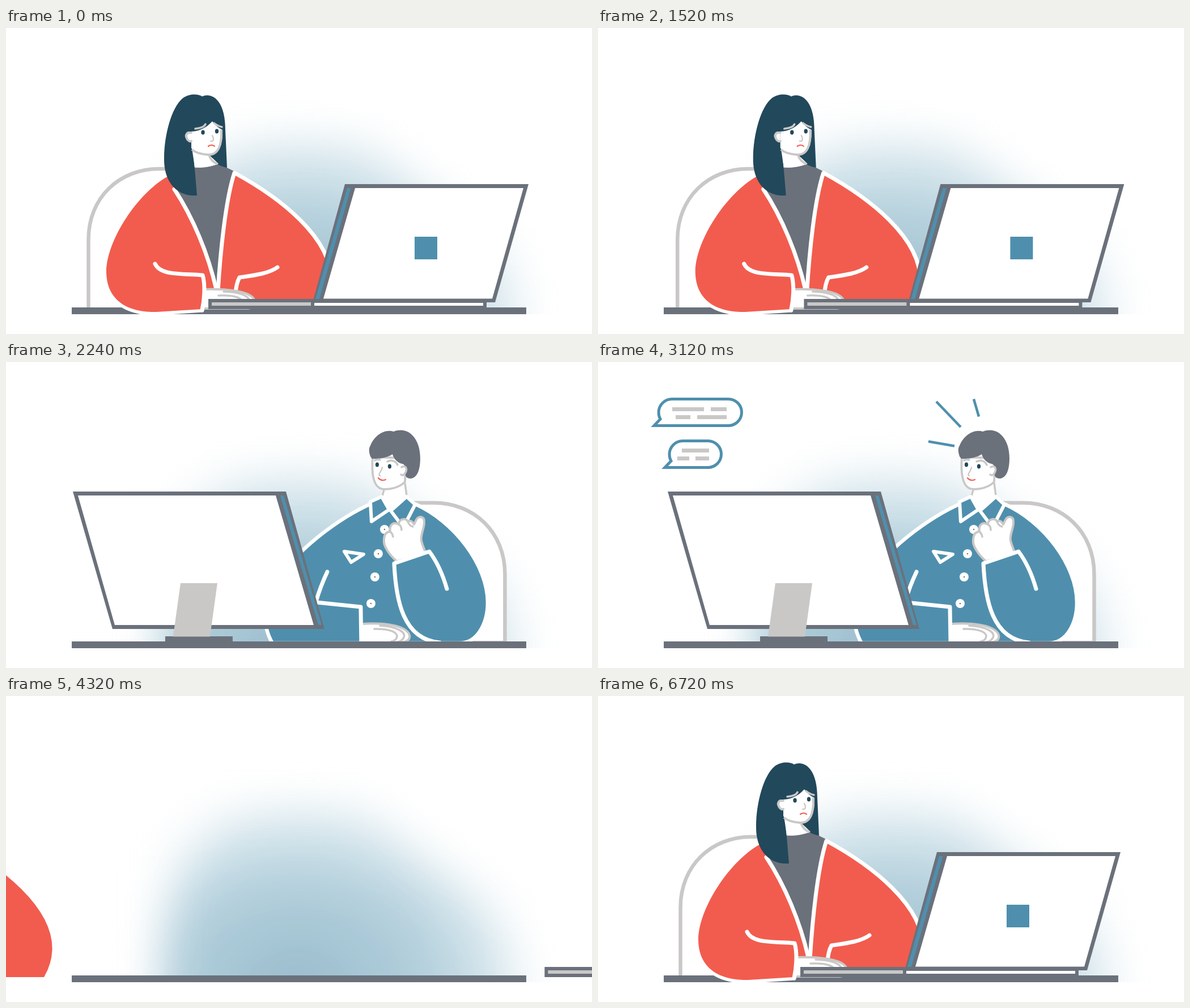
Write an HTML page with a canvas that moves like this. It is 1034 px wide and 541 px high and loops after 6.88 s.

```html
<!DOCTYPE html>
<html lang="en">
<head>
<meta charset="utf-8">
<title>Desk chat</title>
<style>
html, body { margin: 0; width: 100%; height: 100%; overflow: hidden; background: #fff; }
canvas { display: block; }
</style>
</head>
<body>
<canvas id="stage" width="1034" height="541"></canvas>
<script>
const W = 1034, H = 541, LOOP = 6880;
const SLATE = '#6b717b', BLUE = '#4f8fad', RED = '#f25c4e', NAVY = '#22485b', GREY = '#c9c8c7', WHITE = '#fff';
const c = document.getElementById('stage').getContext('2d');

const clamp = v => Math.max(0, Math.min(1, v));
const span = (t, start, dur) => clamp((t - start) / dur);
const inOut = u => u < .5 ? 4 * u ** 3 : 1 - 4 * (1 - u) ** 3;
const mix = (a, b, u) => a + (b - a) * u;

function fill(d, color) {
  c.fillStyle = color;
  c.fill(new Path2D(d));
}
function line(d, color, width, cap = 'round') {
  c.strokeStyle = color;
  c.lineWidth = width;
  c.lineCap = cap;
  c.lineJoin = cap === 'round' ? 'round' : 'miter';
  c.stroke(new Path2D(d));
}
function shape(d, color, edge, width) {
  fill(d, color);
  line(d, edge, width);
}
function rect(x, y, w, h, color) {
  c.fillStyle = color;
  c.fillRect(x, y, w, h);
}
function dot(x, y, rx, ry, color) {
  c.fillStyle = color;
  c.beginPath();
  c.ellipse(x, y, rx, ry, 0, 0, Math.PI * 2);
  c.fill();
}
function at(x, y, draw) {
  c.save();
  c.translate(x, y);
  draw();
  c.restore();
}
function faded(alpha, draw) {
  if (alpha <= 0) return;
  c.save();
  c.globalAlpha *= alpha;
  draw();
  c.restore();
}

// Soft blue glow, rendered once; stretched sideways about x = 515
const glow = document.createElement('canvas');
glow.width = W;
glow.height = H;
{
  const g = glow.getContext('2d');
  g.beginPath();
  g.rect(0, 0, W, 506);
  g.clip();
  g.translate(515, 0);
  g.scale(1.25, 1);
  g.translate(-515, 0);
  const tone = g.createRadialGradient(515, 515, 20, 515, 515, 380);
  tone.addColorStop(0, '#9abbce');
  tone.addColorStop(.2, '#a7c7d5');
  tone.addColorStop(.42, '#b0cdda');
  tone.addColorStop(.57, '#c3dae4');
  tone.addColorStop(.75, '#dae8ee');
  tone.addColorStop(.95, '#f0f6f9');
  g.fillStyle = tone;
  g.filter = 'blur(38px)';
  g.fill(new Path2D('M325 600V500C325 385 345 270 423 217C471 195 567 195 615 217C655 255 687 295 735 330C791 375 819 445 822 520V600Z'));
  g.globalAlpha = .13;
  g.fill(new Path2D('M319 600V240C343 180 423 190 479 195C551 190 615 165 663 220C687 290 807 310 839 400V600Z'));
}

// ---- woman ----
function womanBack() {
  shape('M145.5 496V374C145.5 300 200 249 270 249H350V496', WHITE, GREY, 6.5);
  fill('M300 280L332 247Q352 248 376 240L404 254L385 340L375 465H366Z', SLATE);
  fill('M402 258C480 298 577 370 574 450C573 470 567 485 560 497H340L372 462C375 400 385 310 402 258Z', RED);
  line('M374 465C378 400 387 305 403 256C480 298 577 370 574 450C573 470 567 485 560 497', WHITE, 7);
  line('M405 470Q406 452 412 441C440 437 464 434 479 423', WHITE, 7);
}

function womanFront(happy) {
  const coat = 'M286 262C232 292 178 375 177 430C177 482 215 503 265 502L346 497L350 462H371C357 400 328 335 297 283Z';
  line('M286 262C232 292 174 375 174 430C174 482 212 505 265 504.500L346 499', WHITE, 7);
  fill(coat, RED);
  line('M297 285C330 335 357 400 371 462', WHITE, 7);
  shape('M350 462C385 461 424 464 436 477C444 487 438 496 425 496H348', WHITE, GREY, 4);
  line('M375 473C395 472 416 475 417 484Q416 494 404 495', GREY, 3.5);
  line('M384 466C420 467 432 477 429 486Q426 494 414 496', GREY, 3.5);
  line('M263 417C272 436 300 434 347 437C352 455 350 480 346 499', WHITE, 7);

  // head
  fill('M346 121C361 114 387 124 387 180L390 247C380 245 366 240 360 226L328 190L337 296C300 299 278 270 279 230C279 190 292 140 312 124C325 115 340 117 346 121Z', NAVY);
  fill('M327 205L333 246Q352 249 375 240L358 224Z', WHITE);
  line('M359 227Q363 236 372 240', GREY, 4);
  fill('M327 178L364 162L382 178C383 208 375 226 355 225C340 224 330 218 327 212Z', WHITE);
  line('M380 180C381 207 375 225 356 224C342 223 333 219 328 215', GREY, 4, 'butt');
  shape('M327 185C319 183 316 190 319 195C321 200 325 201 327 200', WHITE, GREY, 4);
  fill('M322 183C338 184 352 178 364 165Q372 176 384 181L380 150L346 122L318 140Z', NAVY);
  const y = (a, b) => mix(a, b, happy).toFixed(2);
  line(`M334 ${y(178, 177)}C${y(343, 338)} ${y(177, 170)} ${y(350, 345)} ${y(175, 168)} 352 170`, GREY, 3.5);
  line(`M367 168C372 ${y(172, 168)} ${y(376, 378)} ${y(174, 171)} 381 175`, GREY, 3.5);
  dot(347.5, 184.500, 3.2, 4, NAVY);
  dot(372, 182.5, 3.2, 4, NAVY);
  line('M364 190C367 196 367 201 361 200', GREY, 2.2);
  line(`M357 209Q363 ${y(205, 214)} 368 ${y(209, 208.5)}`, RED, 2.2);
}

function laptop() {
  rect(357, 479, 491, 18, SLATE);
  rect(363, 485, 175, 6, GREY);
  rect(544, 486, 298, 5, WHITE);
  fill('M598 276H922L863 485H541Z', SLATE);
  fill('M616 283H913L858 478.500H560Z', WHITE);
  fill('M602 283H608.5L553 479H546Z', BLUE);
  rect(721, 369, 40, 40, BLUE);
}

// ---- man ----
function man() {
  shape('M700 249H755C825 249 880.500 300 880.500 375V496H700', WHITE, GREY, 6.5);
  shape('M660 244C600 267 522 322 477 387C452 427 452 465 470 497H800C832 497 850 462 850 425C850 360 792 282 722 251Z', BLUE, WHITE, 6.5);
  fill('M664 225L662 238L677 263L707 238L705 212Z', WHITE);
  line('M667 226L664 237M704 214L707 236', GREY, 3.5, 'butt');
  shape('M643 247L663 238L676 261L645 282Z', BLUE, WHITE, 6);
  shape('M679 263L707 238L722 252L706 283L694 283Z', BLUE, WHITE, 6);
  for (const [x, y] of [[668, 296], [657, 339], [651, 380], [644, 427]]) {
    dot(x, y, 8, 8, WHITE);
    dot(x, y, 1.2, 1.2, SLATE);
  }
  line('M597 335L631 340L609 354Z', WHITE, 6);

  // resting arm
  shape('M628 463C660 461 700 463 711 480C716 491 707 495 695 496H628', WHITE, GREY, 4);
  line('M650 472C675 471 690 477 690 485Q689 493 680 494', GREY, 3.5);
  line('M660 466C692 468 706 478 702 487Q699 494 690 495', GREY, 3.5);
  line('M567 371C558 390 551 410 547 424M539 424L626 433L627 496', WHITE, 7);

  // raised arm
  fill('M685 356L747 335C762 355 780 400 790 440L765 495C700 490 688 420 685 356Z', BLUE);
  shape('M688 351C676 340 666 325 667 316C667 306 670 300 678 300C676 287 684 282 693 287C693 277 706 275 709 282Q715 278 720 287L724 279C727 272 739 271 738 284C738 295 731 305 733 316C735 325 738 330 740 336', WHITE, GREY, 4);
  line('M678 300Q682 303 683 309M693 287Q698 290 698 297M709 282Q712 290 718 291', GREY, 3.5);
  line('M778 401C772 380 762 355 747 335L685 356C688 420 700 490 765 496', WHITE, 7);

  // head
  shape('M647 168C645 195 648 215 658 222C665 227 690 226 704 212L706 170Z', WHITE, GREY, 3.8);
  fill('M643 167C640 158 640 152 643 148C650 130 668 118 684 123C710 113 731 135 731 170C731 190 726 205 714 206C708 206 705 203 705 199C708 190 704 180 699 180C690 178 684 170 682 163C675 168 660 172 646 171Z', SLATE);
  shape('M698 186C706 181 709 190 704 197Q701 202 697 199', WHITE, GREY, 3.5);
  line('M651 174Q655 171 660 173M673 176C680 172 688 175 691 182', GREY, 3.5);
  dot(655, 181.5, 3.1, 4, NAVY);
  dot(677, 184.500, 3.1, 4, NAVY);
  line('M664 186C664 192 655 199 660 201', GREY, 2.2);
  line('M657 205Q662 211 670 208', RED, 2.2);
}

function monitor() {
  rect(281, 485, 119, 10, SLATE);
  fill('M118 229H494L562 472H188Z', SLATE);
  fill('M127 236H476L543 465H192Z', WHITE);
  fill('M484 236H490L557 465H551Z', BLUE);
  fill('M308 391H373L360 485.500H295Z', GREY);
}

// ---- signs ----
// x, y: top left; w: width up to the tail tip
function bubble(x, y, w, h) {
  const l = x + 2.5, t = y + 2.5, b = y + h - 2.5, r = (b - t) / 2, e = x + w - 13;
  c.beginPath();
  c.moveTo(l + r, t);
  c.lineTo(e - r, t);
  c.bezierCurveTo(e - r * .45, t, e, t + r * .45, e, t + r);
  c.quadraticCurveTo(e, t + r * 1.3, e - 3, b - 11.5);
  c.lineTo(x + w - 5, b);
  c.lineTo(l + r, b);
  c.arc(l + r, t + r, r, Math.PI / 2, Math.PI * 1.5);
  c.closePath();
  c.fillStyle = WHITE;
  c.fill();
  c.strokeStyle = BLUE;
  c.lineWidth = 5;
  c.lineJoin = 'miter';
  c.stroke();
}
function bars(x, y, rows) {
  rows.forEach((row, i) => row.forEach(([dx, w]) => rect(x + dx, y + i * 14, w, 7, GREY)));
}
function longNote(x, y) {
  bubble(x, y, 162, 52);
  bars(x + 29, y + 17, [[[0, 28], [40, 56]], [[0, 52], [64, 26]]]);
}
function shortNote(x, y) {
  bubble(x, y, 107, 52);
  bars(x + 24, y + 16, [[[0, 48]], [[0, 24], [35, 21]]]);
}
function cheerNote() {
  bubble(768, 125, 174, 75);
  line('M833 162C830 156 824 152 823 144C822 139 814 140 816 147C817 152 818 154 817 156L804 156C799 157 800 163 803 164C799 167 801 171 804 172C801 175 803 179 806 179C805 183 808 184 812 184L826 183Q830 181 833 181', SLATE, 3.5);
  rect(832, 163, 10, 21, SLATE);
  line('M861.500 163A20.500 20.500 0 1 0 902.500 163A20.500 20.500 0 1 0 861.500 163M871 169Q882 181 893 169', SLATE, 4);
  dot(875, 158, 3, 3, SLATE);
  dot(889, 158, 3, 3, SLATE);
}
function bolts(t) {
  const show = span(t, 120, 240) * (1 - span(t, 1240, 240));
  const size = 1 + .03 * Math.sin((t - 800) * Math.PI / 200);
  faded(show, () => at(335, 150, () => {
    c.scale(size, size);
    c.translate(-335, -150);
    fill('M254 66L282 95L287 91L306 121L282 98L275 103ZM318 69L322 90L327 89L324 107L321 93L316 93ZM247 128L272 134L271 129L292 140L270 137L269 142Z', '#f4695b');
  }));
}
function rays(reach) {
  if (reach <= 0) return;
  for (const [x, y, dx, dy] of [[279, 148.5, -46, -8], [290, 115, -43, -45], [322, 96.5, -9, -31]])
    line(`M${x} ${y}l${dx * reach} ${dy * reach}`, BLUE, 4.5, 'butt');
}

// ---- timeline ----
function deskSet(slide, screen, happy) {
  at(-slide, 0, womanBack);
  rect(116, 494, 802, 12, SLATE);
  at(-slide, 0, () => womanFront(happy));
  at(screen, 0, laptop);
}

function draw(t) {
  c.clearRect(0, 0, W, H);
  rect(0, 0, W, H, WHITE);
  c.drawImage(glow, 0, 0);

  const back = t > 4100;
  const gone = back ? 1 - inOut(span(t, 4120, 560)) : t > 1405 ? Math.min(1.1, ((t - 1405) / 562) ** 3) : 0;
  const away = t < 3000 ? 1 - inOut(span(t, 1840, 460)) : inOut(span(t, 3648, 518));

  if (away < 1) at(600 * away * .97 - 5, 0, man);
  deskSet(600 * gone, 728 * gone, back ? 1 - span(t, 6160, 540) : 0);
  if (away < 1) at(5 - 600 * away, 0, monitor);

  if (t < 1600) {
    bolts(t);
    const show = i => span(t, 120 + 280 * i, 240) * (1 - span(t, 1000 + 120 * i, 240));
    faded(show(0), () => longNote(802, 58));
    faded(show(1), () => shortNote(838, 125));
    faded(show(2), () => longNote(764, 192));
  } else if (t > 2400 && t < 3700) {
    const show = i => span(t, 2440 + 280 * i, 240) * (1 - span(t, 3240 + 160 * i, 240));
    at(1058, 5, () => {
      c.scale(-1, 1);
      faded(show(0), () => longNote(802, 58));
      faded(show(1), () => shortNote(838, 132));
    });
    at(350, 0, () => rays(span(t, 2760, 360) * (1 - span(t, 3280, 360))));
  } else if (back) {
    faded(span(t, 4720, 240) * (1 - span(t, 5920, 240)), () => longNote(802, 58));
    faded(span(t, 5000, 240) * (1 - span(t, 5640, 240)), cheerNote);
    rays(span(t, 4880, 400) * (1 - span(t, 5720, 400)));
  }
}

function tick() {
  draw(performance.now() % LOOP);
  requestAnimationFrame(tick);
}
tick();
</script>
</body>
</html>
```
